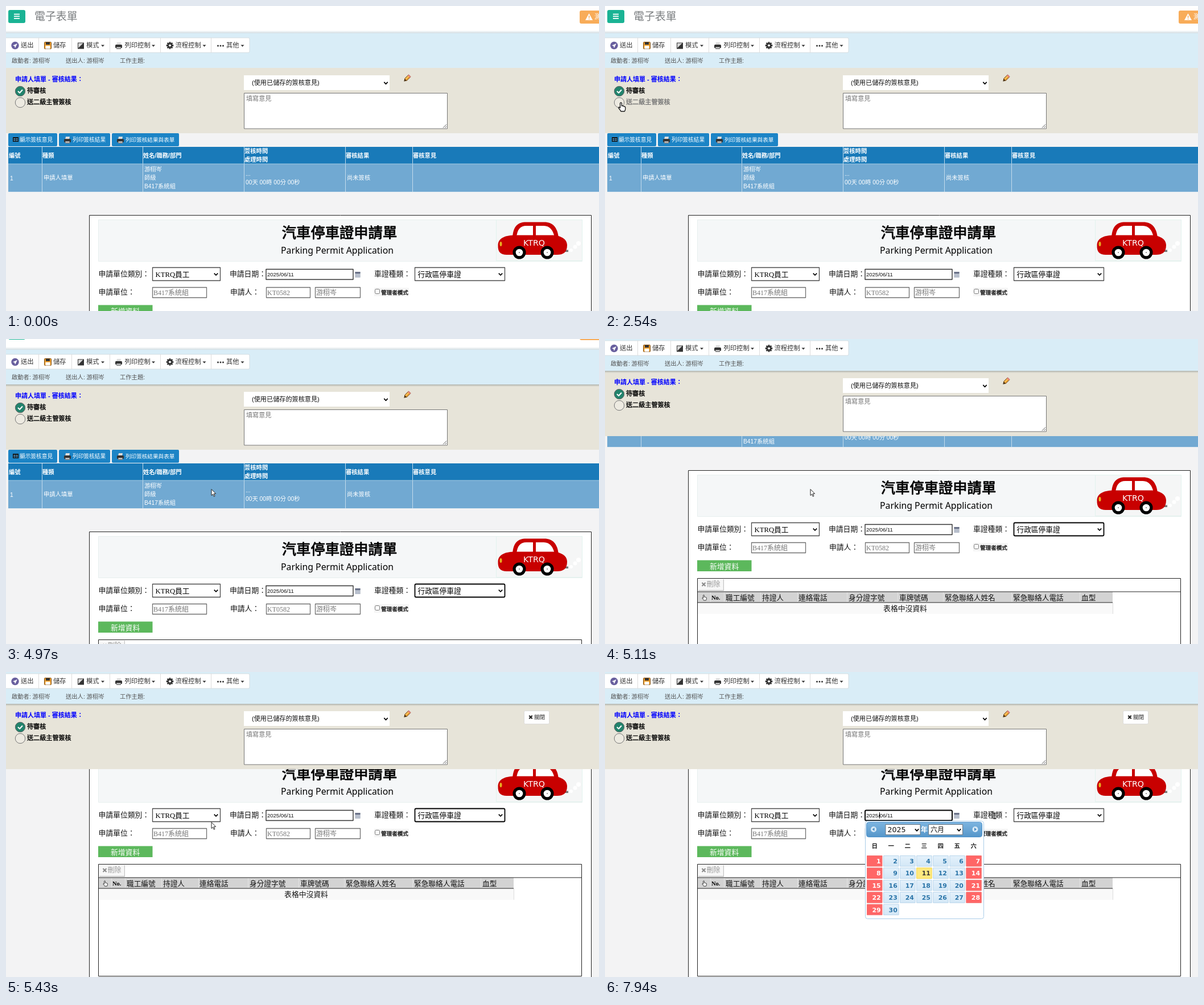
Animation, 1042 px wide and 537 px high, one loop 7990 ms. Source, as an HTML page with a canvas:

```html
<!DOCTYPE html>
<html lang="zh-Hant">
<head>
<meta charset="utf-8">
<title>電子表單</title>
<style>
html, body { margin: 0; width: 100%; height: 100%; overflow: hidden; background: #f3f3f4; }
canvas { display: block; width: 100%; height: 100%; }
</style>
</head>
<body>
<canvas id="stage" width="1042" height="537"></canvas>
<script>
const c = document.getElementById('stage').getContext('2d');
const LOOP = 7990, STEP = 70;
const CJK = "'Noto Sans CJK TC', 'Noto Sans CJK', sans-serif";
const ARIAL = "'Liberation Sans', " + CJK;
const TIMES = "'Liberation Serif', " + CJK;
const VERDANA = "'DejaVu Sans', " + CJK;
const PERSON = '游栩岑', STAFF = 'KT0582', ORG = 'KTRQ', UNIT = 'B417系統組';

// y is the visual middle of the line
function text(s, x, y, size, color = '#000', font = CJK, weight = 400, align = 'left') {
  c.font = `${weight} ${size}px ${font}`;
  c.fillStyle = color;
  c.textAlign = align;
  c.fillText(s, x, y + size * 0.37);
}
// medium weight: regular glyphs with a thin outline
function mediumText(s, x, y, size, color = '#000', align = 'left') {
  text(s, x, y, size, color, CJK, 400, align);
  c.strokeStyle = color;
  c.lineWidth = size * 0.035;
  c.strokeText(s, x, y + size * 0.37);
}
function rect(x, y, w, h, color) {
  c.fillStyle = color;
  c.fillRect(x, y, w, h);
}
function box(x, y, w, h, fill, stroke, lw = 1, r = 0) {
  c.beginPath();
  c.roundRect(x, y, w, h, r);
  if (fill) { c.fillStyle = fill; c.fill(); }
  if (stroke) { c.strokeStyle = stroke; c.lineWidth = lw; c.stroke(); }
}
function disc(x, y, r, fill, stroke, lw = 1) {
  c.beginPath();
  c.arc(x, y, r, 0, 7);
  if (fill) { c.fillStyle = fill; c.fill(); }
  if (stroke) { c.strokeStyle = stroke; c.lineWidth = lw; c.stroke(); }
}
function line(color, lw, ...p) {
  c.beginPath();
  for (let i = 0; i < p.length; i += 2) c.lineTo(p[i], p[i + 1]);
  c.strokeStyle = color;
  c.lineWidth = lw;
  c.stroke();
}
function poly(fill, ...p) {
  c.beginPath();
  for (let i = 0; i < p.length; i += 2) c.lineTo(p[i], p[i + 1]);
  c.closePath();
  c.fillStyle = fill;
  c.fill();
}
function path(d, fill, stroke, lw = 1) {
  const p = new Path2D(d);
  if (fill) { c.fillStyle = fill; c.fill(p); }
  if (stroke) { c.strokeStyle = stroke; c.lineWidth = lw; c.stroke(p); }
}
function fade(y0, y1, a, b) {
  const g = c.createLinearGradient(0, y0, 0, y1);
  g.addColorStop(0, a);
  g.addColorStop(1, b);
  return g;
}
function at(x, y, draw) {
  c.save();
  c.translate(x, y);
  draw();
  c.restore();
}
const chevron = (x, y) => line('#000', 1.7, x - 3.2, y - 1.6, x, y + 1.8, x + 3.2, y - 1.6);
const caret = (x, y) => poly('#333', x - 3, y - 1.5, x + 3, y - 1.5, x, y + 1.7);
const cross = (x, y, r, color) => {
  line(color, 2.2, x - r, y - r, x + r, y + r);
  line(color, 2.2, x - r, y + r, x + r, y - r);
};

function printer(x, y) {
  at(x, y, () => {
    poly('#ddd', -3, -6, 4, -6, 3, -1, -4, -1);
    box(-6, -2, 12, 6, '#333', null, 1, 1.5);
    rect(-4, 2, 8, 4, '#888');
    rect(-3, 3, 6, 1, '#eee');
  });
}
function gear(x, y) {
  at(x, y, () => {
    for (let i = 0; i < 8; i++) {
      c.rotate(Math.PI / 4);
      rect(-1.4, -6.3, 2.8, 4, '#333');
    }
    disc(0, 0, 3.4, null, '#333', 2.6);
  });
}
function pencil(x, y) {
  at(x, y, () => {
    c.rotate(-0.78);
    box(-4, -2.5, 10, 5, '#f3a32e', '#5d3a12', 0.9);
    rect(4, -2.5, 2.5, 5, '#e48080');
    poly('#4a3010', -4, -2.7, -8, 0, -4, 2.7);
    line('#ffd988', 1, -3, -0.8, 4, -0.8);
  });
}
function calendarIcon(x, y) {
  rect(x, y, 9, 10, '#9aa3b4');
  rect(x, y, 9, 3, '#6b7288');
  for (let i = 0; i < 9; i++) rect(x + 1 + i % 3 * 2.6, y + 4 + (i / 3 | 0) * 2, 1.7, 1.2, '#e6eaf2');
}

function signTable() {
  box(4, 224, 86, 23, '#1c84c6', null, 1, 2);
  box(93, 224, 90, 23, '#1c84c6', null, 1, 2);
  box(186, 224, 118, 23, '#1c84c6', null, 1, 2);
  rect(12, 231, 10, 8, '#111');
  for (let i = 0; i < 4; i++) rect(13.3 + i % 2 * 4.2, 233 + (i >> 1) * 2.8, 3.2, 1.6, '#5aa6d8');
  printer(108, 236);
  printer(201, 236);
  text('顯示簽核意見', 24, 235, 9.7, '#fff');
  text('列印簽核結果', 117, 235, 9.7, '#fff');
  text('列印簽核結果與表單', 210, 235, 9.6, '#fff');

  rect(4, 248, 1038, 30, '#197ab9');
  rect(4, 278, 1038, 49, '#71a9d2');
  for (const x of [63, 240, 418, 596, 714]) rect(x, 248, 1, 79, '#c3dbec');
  rect(4, 277.5, 1038, 1, '#a8cbe4');
  rect(4, 327, 1038, 1, '#dfe9f0');
  const head = (s, x, y = 263) => text(s, x, y, 10.3, '#fff', ARIAL, 700);
  head('編號', 5);
  head('種類', 64);
  head('姓名/職務/部門', 241);
  head('簽核時間', 419, 255);
  head('處理時間', 419, 270);
  head('審核結果', 597);
  head('審核意見', 715);
  const cell = (s, x, y) => text(s, x, y, 10.3, '#fff', ARIAL);
  cell('1', 7, 303);
  cell('申請人填單', 66, 302.5);
  cell(PERSON, 243, 287.5);
  cell('師級', 243, 302.5);
  cell(UNIT, 243, 317.5);
  cell('...', 421, 295);
  cell('00天 00時 00分 00秒', 421, 310);
  cell('尚未簽核', 599, 302.5);
}

function car() {
  rect(861, 377, 151, 71, '#f5f6f6');
  box(861.5, 376.5, 151, 72, null, '#e2f3ee');
  for (const [x, y, r] of [[993, 430, 3], [1000, 424, 3.5], [1006, 418, 4]]) disc(x, y, r, '#fff');
  rect(980, 429.5, 8, 3.5, '#777');
  path('M890 408 C891 388 899 380.5 914 380.5 L946 380.5 C961 380.5 969 390 971 408 Z', '#c80000');
  path('M897 408 C898 393 904 387 914 387 L926 387 L926 408 Z', '#fff');
  path('M931 408 L931 387 L945 387 C956 387 962 396 964 408 Z', '#fff');
  path('M864.5 421 C865 408 878 403.5 895 403.5 L958 403.5 C976 403.5 986 411 986 421 C986 434 979 438 968 438 L880 438 C869 438 864 433 864.5 421 Z', '#c80000');
  c.beginPath();
  c.ellipse(869.5, 419, 2, 4, 0, 0, 7);
  c.fillStyle = '#e8b020';
  c.fill();
  for (const x of [902, 951]) {
    disc(x, 434, 11.5, '#000');
    disc(x, 434, 6.3, '#fff');
    disc(x, 434, 1, '#777');
  }
  text(ORG, 928, 417, 14.2, '#fff', VERDANA, 400, 'center');
}

function select(x, y, w, label, font, size, focus) {
  box(x, y, w, 23, '#fff', focus ? '#000' : '#4a4a4a', focus ? 1.8 : 1.3, focus ? 2 : 0);
  text(label, x + 5, y + 11.5, size, '#000', font);
  chevron(x + w - 7.5, y + 11.7);
}
function readonly(x, w, s) {
  box(x + 0.5, 495.5, w, 18, '#fff', '#6f6f6f', 1.3);
  text(s, x + 2, 505, 12, '#777', TIMES);
}

function form(t) {
  rect(146, 368, 883, 700, '#fff');
  box(146.5, 368.5, 882, 700, null, '#222');
  rect(162, 376, 850, 73, '#f5f7f8');
  box(162.5, 376.5, 850, 73, null, '#e7efee');
  car();
  mediumText('汽車停車證申請單', 586, 399, 25.3, '#000', 'center');
  text('Parking Permit Application', 582, 430.5, 15.8, '#000', "'Noto Sans', sans-serif", 400, 'center');

  const label = (s, x, y) => text(s, x, y, 12.8, '#111');
  label('申請單位類別：', 162.5, 471);
  label('申請日期：', 393, 471);
  label('車證種類：', 647, 471);
  label('申請單位：', 162.5, 503.5);
  label('申請人：', 394, 503.5);
  select(257.5, 460.5, 119, ORG + '員工', TIMES, 12.7, false);
  select(718.5, 460.5, 158, '行政區停車證', CJK, 12.7, t >= 2900 && t < 6050);

  const editing = t >= 7400;
  box(457, 463.5, 153, 18, '#fff', editing ? '#000' : '#333', editing ? 1.9 : 1.4, editing ? 2 : 0);
  text('2025/06/11', 459, 472.5, 9.5, '#111', ARIAL);
  if (editing) rect(482, 467, 1, 11, '#000');
  calendarIcon(613.5, 468);

  readonly(257, 95, UNIT);
  readonly(457, 77, STAFF);
  readonly(543, 79, PERSON);
  rect(647, 496, 61, 15, '#f5f5f5');
  box(648.5, 498.5, 8, 8, '#fff', '#767676', 1, 2);
  mediumText('管理者模式', 659, 504, 9.6, '#111');

  rect(162, 526.5, 95.5, 19.5, '#5cb85c');
  text('新增資料', 184, 537, 12.8, '#fff');
  grid();
}

function grid() {
  box(162.5, 558.5, 849, 197, null, '#222');
  rect(164, 579, 45, 1.5, '#c4c4c4');
  rect(207.5, 560, 1.5, 20, '#c4c4c4');
  rect(163, 559, 44.5, 20, '#f7f7f7');
  cross(173.5, 569, 3, '#8b8b8b');
  text('刪除', 178.5, 568.5, 12, '#999');
  rect(163, 582, 729, 19, '#d3d3d3');
  rect(163, 581.5, 849, 1, '#222');
  rect(163, 601, 729, 20, '#f9f9f9');
  rect(163, 600.5, 729, 1, '#222');
  rect(892, 601, 1, 20, '#ddd');
  for (const x of [185, 209, 273, 338, 425, 514, 594, 714, 834]) rect(x, 583, 1, 17, '#e4e4e4');
  at(173.5, 587.5, () => {
    c.scale(0.62, 0.62);
    hand();
  });
  text('No.', 187, 592, 10.5, '#000', TIMES, 700);
  const names = { 212: '職工編號', 276: '持證人', 340: '連絡電話', 428: '身分證字號', 517: '車牌號碼',
    597: '緊急聯絡人姓名', 717: '緊急聯絡人電話', 837: '血型' };
  for (const x in names) text(names[x], +x, 592, 12.7, '#111');
  text('表格中沒資料', 527.5, 611, 12.8, '#111', CJK, 400, 'center');
}

function titleBar() {
  rect(0, 0, 1042, 48, '#fff');
  rect(0, 43, 1042, 6, fade(43, 49, '#fff', '#c9d6dc'));
  box(4, 7, 30, 23, '#1ab394', null, 1, 3);
  for (const y of [13.6, 17.3, 21]) rect(14, y, 10, 1.8, '#fff');
  text('電子表單', 50, 18, 18.9, '#7b7e80', CJK, 200);
  box(1008, 8, 50, 23, '#f8ac59', null, 1, 3);
  poly('#fff', 1024.5, 13, 1031, 25, 1018, 25);
  rect(1023.8, 17, 1.6, 4, '#f8ac59');
  rect(1023.8, 22.3, 1.6, 1.5, '#f8ac59');
  text('測', 1034, 19, 11, '#fff');
}

function toolbar() {
  rect(0, 48, 1042, 61, '#d9edf7');
  box(-2, 56, 430, 26, '#fff', '#d5dde1', 1, 2);
  for (const x of [57, 115, 182, 271, 360]) rect(x, 56, 1, 26, '#ddd');
  disc(16, 69.5, 6.7, '#685f9e');
  poly('#fff', 20, 66, 12, 69.5, 15, 70.5, 16, 74);
  box(67.5, 63.5, 12, 12, '#f0a030', '#7a4a10', 1, 1);
  rect(70, 64, 7, 4, '#333');
  rect(69.5, 70, 8, 5.5, '#fff');
  rect(126, 64.5, 11, 11, '#333');
  poly('#d8d8d8', 127, 65.5, 135.5, 65.5, 127, 74);
  printer(198, 70);
  gear(288, 69.5);
  for (const x of [372.5, 377, 381.5]) disc(x, 70, 1.5, '#333');
  const item = (s, x) => text(s, x, 69, 11.3, '#333');
  item('送出', 26);
  item('儲存', 83);
  item('模式', 141);
  item('列印控制', 208.5);
  item('流程控制', 297.5);
  item('其他', 387);
  for (const x of [170, 259, 348.5, 415.5]) caret(x, 70);
  const info = (s, x) => text(s, x, 96, 10.3, '#555', ARIAL);
  info('啟動者: ' + PERSON, 10);
  info('送出人: ' + PERSON, 105);
  info('工作主題:', 200);
}

function panel(t, scroll, hover) {
  rect(0, 109, 1042, 115, '#e7e4d9');
  if (scroll) rect(0, 109, 1042, 4, fade(109, 113, '#b0b3ad', '#e7e4d9'));
  text('申請人填單 - 審核結果：', 16, 128.5, 11, '#00f', ARIAL, 700);
  disc(25, 150, 8.7, '#22836c', '#666');
  line('#fff', 2, 21, 150, 24, 153, 29, 147.5);
  disc(25, 170, 8.7, '#edeae1', '#777');
  mediumText('待審核', 37, 148.5, 11.1, hover === 1 ? '#777' : '#000');
  mediumText('送二級主管簽核', 37, 169, 11.1, hover === 2 ? '#777' : '#000');
  rect(418, 122, 256, 26, '#fff');
  text('(使用已儲存的簽核意見)', 432, 135, 11.15, '#111', ARIAL);
  chevron(667.5, 135.5);
  pencil(705, 127);
  box(418.5, 153.5, 357, 62.5, '#fff', '#767676');
  text('填寫意見', 422, 163, 11.1, '#757575');
  line('#555', 1, 768, 214.5, 774, 208.5);
  line('#555', 1, 771.5, 214.5, 774, 212);
  if (t >= 5250) {
    box(910.5, 121.5, 44, 23, '#fff', '#dcdcdc', 1, 2);
    cross(922, 132.5, 2.7, '#222');
    text('關閉', 928, 132.5, 9.6, '#222');
  }
}

function dropdown() {
  c.save();
  c.shadowColor = 'rgba(0,0,0,.3)';
  c.shadowBlur = 36;
  c.shadowOffsetY = 18;
  box(258, 264, 118, 48, '#fff', null, 1, 6);
  c.restore();
  box(258, 264, 118, 48, '#fff', '#c4c4c4', 1, 6);
  box(258, 264, 118, 25, '#1a67d2', null, 1, [6, 6, 0, 0]);
  text(ORG + '員工', 262, 278, 12.7, '#fff', TIMES);
  text('協力廠商', 262, 301, 12.7, '#111');
}

function datePicker() {
  box(457.5, 262.5, 208, 172, '#fff', '#a9cce8', 1, 4);
  box(459.5, 264.5, 203, 26, fade(264, 291, '#7db5e0', '#5495c9'), '#4f94cd', 1, 4);
  for (const [x, d] of [[472, 1], [650.5, -1]]) {
    disc(x, 277, 5, '#d6e8f6');
    poly('#4d8fc4', x - 2.5 * d, 277, x + 1.5 * d, 274, x + 1.5 * d, 280);
  }
  box(493, 268.5, 61, 18, '#fff', '#6b7680');
  box(568.5, 268.5, 60, 18, '#fff', '#6b7680');
  text('2025', 496.5, 277.5, 12.6, '#111', VERDANA);
  text('六月', 572, 277.5, 12, '#111');
  chevron(548, 278);
  chevron(622, 278);
  text('年', 555, 277.5, 12, '#fff', CJK, 700);
  [...'日一二三四五六'].forEach((d, i) =>
    text(d, 473.7 + i * 29, 306.5, 10.5, '#222', CJK, 700, 'center'));
  for (let d = 1; d <= 30; d++) {
    const col = (d - 1) % 7, x = 460.5 + col * 29.05, y = 323.5 + ((d - 1) / 7 | 0) * 21.4;
    const weekend = col === 0 || col === 6, today = d === 11;
    const fill = today ? '#ffe97f' : weekend ? '#ff6666' : fade(y, y + 19, '#e4f1fb', '#d3e7f6');
    box(x, y, 26.5, 18.6, fill, today ? '#f2d64a' : weekend ? '#f47474' : '#b9d6ec');
    text(String(d), x + 24.2, y + 9.5, 10.9, today ? '#363636' : weekend ? '#fff' : '#2a74a8', VERDANA, 700, 'right');
  }
}

function arrow() {
  path('M0 0 L0 11 L2.5 8.7 L4.3 12.8 L6 12 L4.2 8 L7.6 7.8 Z', '#fff', '#222');
}
function iBeam() {
  path('M-2.5 -5 H-.8 L0 -4.2 L.8 -5 H2.5 M0 -4.2 V4.2 M-2.5 5 H-.8 L0 4.2 L.8 5 H2.5', null, '#222', 1.1);
}
function hand() {
  path('M-1.4 1 Q0 -1.4 1.4 1 V6 Q3 4.7 3.8 6.5 Q5.4 5.6 6 7.3 Q7.6 6.6 7.8 8.6 V11.5 Q7.6 13.5 6.4 15.5 H0 Q-1 13 -4 10 Q-4.8 8 -2.8 8.2 L-1.4 9.5 Z', '#fff', '#111', 1.3);
}

// time, x, y of the pointer tip
const route = [
  [70, 641, 0], [820, 627, 128], [1200, 624, 135], [1670, 584, 150], [1740, 560, 152],
  [2450, 44, 151], [2520, 28, 170], [2760, 28, 170], [3350, 250, 166], [4060, 432, 188],
  [4250, 432, 190], [4900, 361, 264.5], [5450, 361, 264.5], [5750, 344, 253], [5910, 340.5, 251.5],
  [6980, 340.5, 251.5], [7350, 540, 253.5], [7700, 541, 253.5], [7910, 685, 253.5], [LOOP, 685, 253.5]
];
function pointer(t) {
  const i = route.findIndex(k => k[0] > t);
  if (i < 1) return null;
  const [t0, x0, y0] = route[i - 1], [t1, x1, y1] = route[i];
  const u = (t - t0) / (t1 - t0), e = u * u * (3 - 2 * u);
  return { x: x0 + (x1 - x0) * e, y: y0 + (y1 - y0) * e };
}
function pointerShape({ x, y }, t, hover) {
  if (hover) return hand;
  const within = (l, a, r, b) => x > l && x < r && y > a && y < b;
  if (t < 4940) return within(418, 153, 776, 216) ? iBeam : arrow;
  return within(456, 242, 610, 262) || within(647, 245, 708, 258) ? iBeam : arrow;
}
function scrollAt(t) {
  const u = Math.min(1, Math.max(0, (t - 4940) / 440));
  return Math.round(220 * (1 - (1 - u) ** 2));
}

function draw(t) {
  const scroll = scrollAt(t), p = pointer(t);
  const hover = t < 4000 && p && p.x < 116 && p.y > 140 && p.y < 180 ? (p.y < 160 ? 1 : 2) : 0;
  rect(0, 0, 1042, 537, '#f3f3f4');
  at(0, -scroll, () => { signTable(); form(t); });
  at(0, -Math.min(53, scroll), () => {
    titleBar();
    toolbar();
    panel(t, scroll, hover);
  });
  if (t >= 6050 && t < 6950) dropdown();
  if (t >= 7400) {
    c.globalAlpha = Math.min(1, (t - 7400) / 140);
    datePicker();
    c.globalAlpha = 1;
  }
  if (p) at(p.x, p.y, pointerShape(p, t, hover));
}

function tick() {
  const t = performance.now() % LOOP;
  draw(Math.floor(t / STEP) * STEP);
  requestAnimationFrame(tick);
}
c.lineJoin = 'round';
tick();
</script>
</body>
</html>
```
